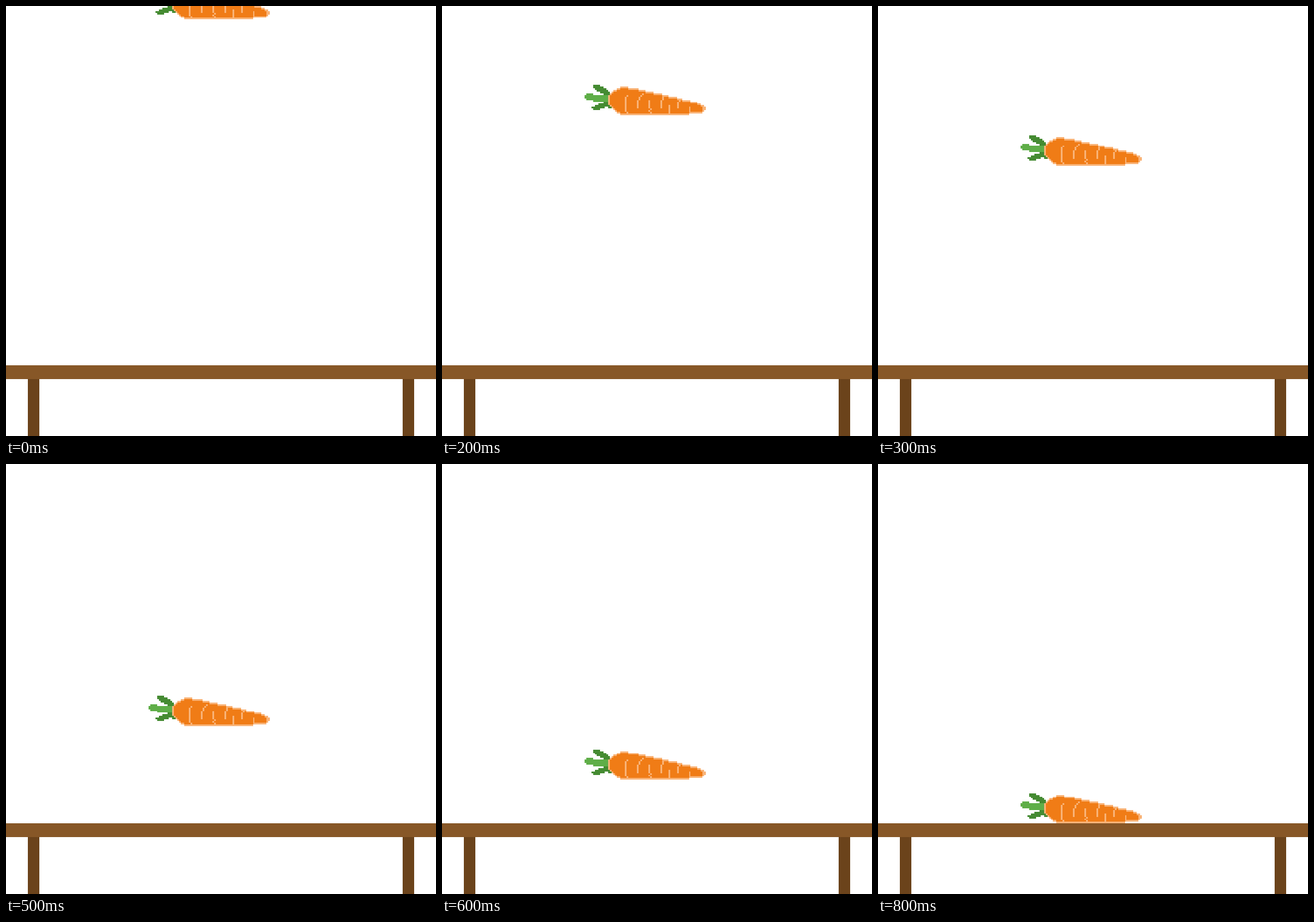
Write an HTML page that moves like this. It is 748x748 px and loops after 900 ms.

```html
<!DOCTYPE html>
<html lang="en">
<head>
<meta charset="utf-8">
<title>Falling carrot</title>
<style>
  html, body { margin: 0; width: 100%; height: 100%; overflow: hidden; background: #fff; }
  svg { display: block; width: 100vw; height: 100vh; }
</style>
</head>
<body>
<svg viewBox="0 0 256 256" shape-rendering="crispEdges">
  <path fill="#6b431b" d="M13 222h7v34h-7zM236 222h7v34h-7z"/>
  <path fill="#875727" d="M0 214h256v8H0z"/>
  <g id="carrot" transform="translate(85 -10)">
    <!-- leaves -->
    <path fill="#458b32" d="M5 0h4v1h2v1h2v1h1v1h1v1h1v2h-4v-1h-1v-1h-2v-1h-2v-1h-1v-1h-1z
      M11 10h4v2h1v2h-2v-1h-2v1h-3v1h-4v-1h-1v-1h2v-1h2v-1h3z"/>
    <path fill="#5fae48" d="M1 5h4v1h9v4h-9v-1h-4v-1h-1v-2h1z"/>
    <!-- rim, flesh, grooves -->
    <path fill="#f9b377" d="M21 1h5v1h6v1h4v1h5v1h5v1h4v1h5v1h3v1h5v1h4v1h2v1h2v1h1v2h-1v1h-1v1h-8v1h-41
      v-1h-2v-1h-1v-1h-1v-1h-1v-1h-1v-1h-1v-6h1v-1h1v-1h1v-1h2v-1h2z"/>
    <path fill="#f07c16" d="M21 2h5v1h6v1h4v1h5v1h5v1h4v1h5v1h3v1h5v1h4v1h2v1h1v3h-8v1h-41
      v-1h-2v-1h-1v-1h-1v-1h-1v-1h-1v-6h1v-1h1v-1h2v-1h2z"/>
    <path fill="#f9b377" d="M25 6h1v1h-1v9h1v1h-1v-1h-1v-9h1z
      M34 5h1v1h-1v1h-1v2h-1v5h-1v-5h1v-2h1v-1h1z
      M38 9h1v5h1v1h-1v1h1v1h-1v-1h-1v-1h1v-1h-1z
      M46 7h1v2h-1v5h-1v-5h1z M50 12h1v5h-1z
      M56 9h1v1h-1v4h-1v-4h1z M62 13h1v4h-1z"/>
  </g>
</svg>
<script>
  const carrot = document.getElementById('carrot');
  const stepMs = 100;
  const tops = [-10, 18, 47, 77, 107, 138, 170, 185, 196];
  const start = performance.now();

  function draw() {
    const step = Math.floor((performance.now() - start) / stepMs) % tops.length;
    carrot.setAttribute('transform', `translate(85 ${tops[step]})`);
    requestAnimationFrame(draw);
  }
  draw();
</script>
</body>
</html>
```
